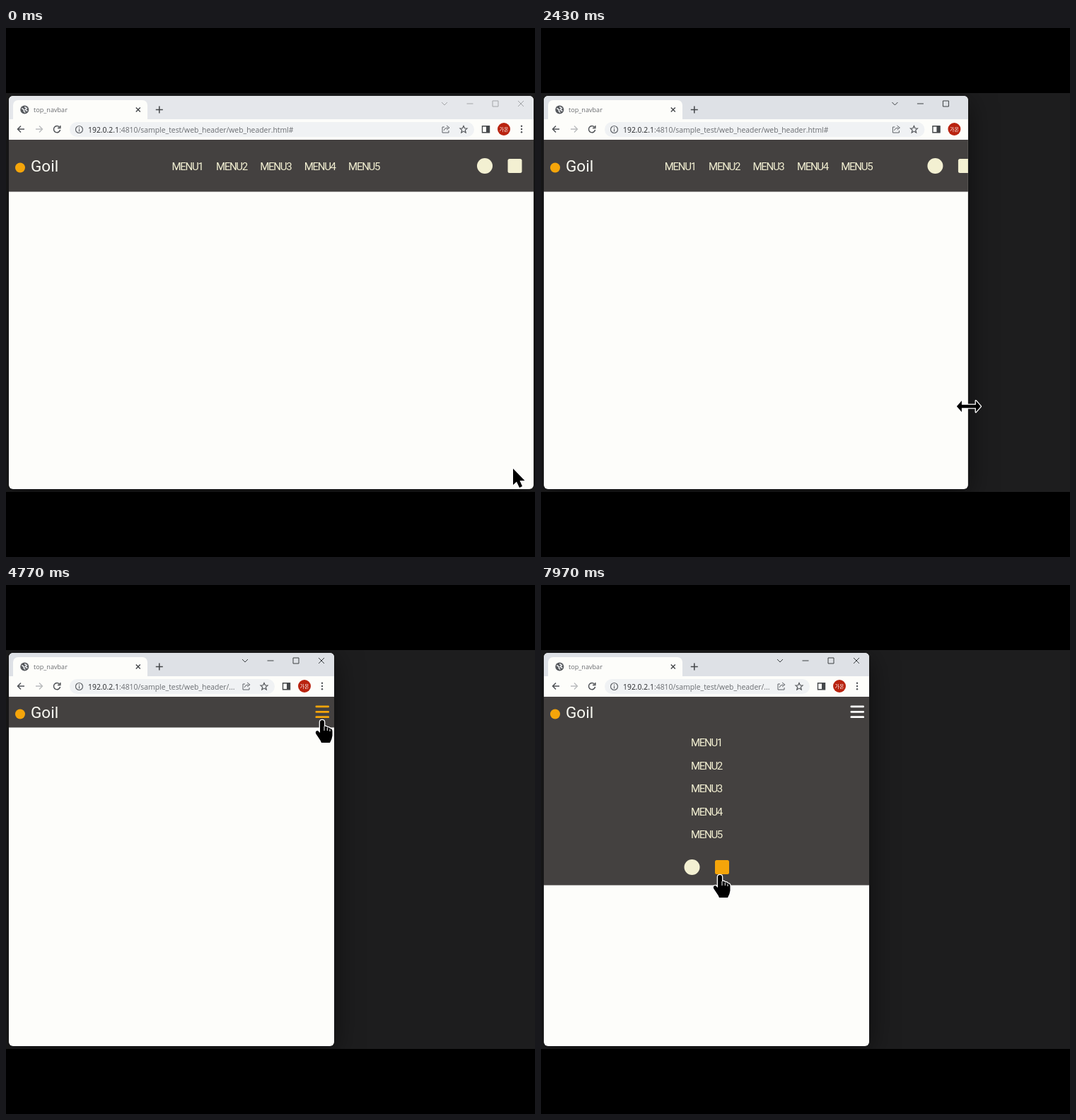
These frames come from a looping animation (748 by 748 pixels, 8 s). An HTML page with a canvas:

```html
<!DOCTYPE html>
<html lang="en">
<head>
<meta charset="utf-8">
<title>Responsive navbar</title>
<style>
  html, body { margin: 0; width: 100%; height: 100%; overflow: hidden; background: #000; }
  canvas { display: block; width: 100%; height: 100%; }
</style>
</head>
<body>
<canvas id="stage" width="748" height="748"></canvas>
<script>
const ctx = document.getElementById('stage').getContext('2d');
const LOOP = 8000, LAG = 83, BREAKPOINT = 610, OPEN_AT = 5100;
const PAGE = '#fdfdfa', NAV = '#444140', CREAM = '#f3f0d2', ORANGE = '#f5a50a', GREY = '#5f6368';
const UI = '"Open Sans", "Noto Sans", sans-serif', MENU = 'Roboto, sans-serif';
const HOST = '192.0.2.1', PATH = ':4810/sample_test/web_header/web_header.html#';

// [time, value, ...]
const edgeKeys = [[1300, 746], [1700, 716], [2130, 686], [2430, 604], [2700, 570],
  [3080, 520], [3240, 520], [3770, 492], [4200, 464]];
const pointerKeys = [[30, 717, 623], [300, 752, 585], [470, 752, 572], [600, 733, 543],
  [900, 733, 543], [1030, 754, 541], [4300, 464, 540], [4600, 447, 192], [6000, 447, 192],
  [6300, 385, 222], [6550, 320, 262], [6800, 279, 275], [7000, 281, 300], [7250, 272, 338],
  [7450, 238, 378], [7630, 213, 404], [7670, 213, 404], [7970, 253, 411]];

function at(keys, t) {
  const i = keys.findIndex(k => k[0] > t);
  if (i < 0) return keys[keys.length - 1].slice(1);
  if (i === 0) return keys[0].slice(1);
  const a = keys[i - 1], b = keys[i], p = (t - a[0]) / (b[0] - a[0]);
  return a.slice(1).map((v, n) => v + (b[n + 1] - v) * p);
}

function box(x, y, w, h, fill, r = 0) {
  ctx.fillStyle = fill;
  ctx.beginPath();
  ctx.roundRect(x, y, w, h, r);
  ctx.fill();
}

function disc(x, y, r, fill) {
  ctx.fillStyle = fill;
  ctx.beginPath();
  ctx.arc(x, y, r, 0, 7);
  ctx.fill();
}

function line(path, x, y, color = GREY, width = 1.3) {
  ctx.save();
  ctx.translate(x, y);
  ctx.strokeStyle = color;
  ctx.lineWidth = width;
  ctx.stroke(new Path2D(path));
  ctx.restore();
}

function text(s, x, y, size, color, font = UI, align = 'left', spacing = 0) {
  ctx.font = `${size}px ${font}`;
  ctx.letterSpacing = spacing + 'px';
  ctx.textAlign = align;
  ctx.fillStyle = color;
  ctx.fillText(s, x, y);
  const width = ctx.measureText(s).width;
  ctx.letterSpacing = '0px';
  return width;
}

function drawTabs(right, active) {
  const color = active ? '#3c4043' : '#a3a5a8';
  box(4, 96, 742, 33, active ? '#dee1e6' : '#e5e7eb');
  box(10, 102, 190, 28, PAGE, [7, 7, 0, 0]);
  disc(26.3, 115.5, 6, '#55585c');
  line('M-4 -2 Q0 0 -1 2 L1 4 M0 -4 L3 -2 L1 0 L4 2', 26.3, 115.5, '#e8eaed', 1.6);
  text('top_navbar', 39, 118.8, 9.1, '#6a6c70');
  line('M-3 -3 L3 3 M3 -3 L-3 3', 186.8, 115.5, '#44474a', 1.4);
  line('M-5 0 H5 M0 -5 V5', 216.8, 115.5, '#44474a', 1.5);
  line('M-4 -2 L0 2 L4 -2', right - 126, 107, color, 1);
  line('M-4.5 0 H4.5', right - 90, 107, color, 1);
  line('M-4 -4 H4 V4 H-4 Z', right - 54, 107, color, 1);
  line('M-4 -4 L4 4 M4 -4 L-4 4', right - 18, 107, color, 1);
}

function drawAddress(right) {
  box(4, 129, 742, 29, PAGE);
  line('M5 0 H-4 M0 -4.5 L-4.5 0 L0 4.5', 21, 143, '#505357', 1.5);
  line('M-5 0 H4 M0 -4.5 L4.5 0 L0 4.5', 47, 143, '#babcbe', 1.4);
  line('M3.6 -2.8 A4.6 4.6 0 1 0 4.6 1 M4.8 -5 V-1.4 H1', 72, 143, '#505357', 1.5);
  box(90, 133, right - 174, 21, '#f0f2f4', 10.5);
  line('M5 0 A5 5 0 1 1 -5 0 A5 5 0 1 1 5 0 M0 -.8 V3 M0 -3 V-1.8', 103.5, 143.5, GREY, 1.2);

  ctx.font = '10.4px ' + UI;
  let rest = PATH;
  const room = right - 139 - 116;
  if (ctx.measureText(HOST + rest).width > room) {
    while (rest && ctx.measureText(HOST + rest + '...').width > room) rest = rest.slice(0, -1);
    rest += '...';
  }
  const used = text(HOST, 116, 147.5, 10.4, '#25272a');
  text(rest, 116 + used, 147.5, 10.4, '#6a6d71');

  line('M-2 -3 H-5 V5 H4 V2 M-3 2 Q-2 -2 3 -2 M1 -5 L5 -2 L1 1', right - 124, 143, GREY, 1);
  line('M0 -5 L1.5 -1.7 L5 -1.4 L2.3 .9 L3.2 4.5 L0 2.6 L-3.2 4.5 L-2.3 .9 L-5 -1.4 L-1.5 -1.7 Z',
    right - 99, 143.5, '#505357', 1.2);
  line('M-5 -4.5 H5 V4.5 H-5 Z', right - 67.5, 143.3, '#44474a', 1.4);
  box(right - 67, 138.8, 5, 9, '#44474a');
  disc(right - 42, 143, 9, '#b9230f');
  text('가온', right - 42, 145.7, 7, '#fff', '"Noto Sans CJK KR", "Noto Sans CJK", sans-serif', 'center');
  for (let i = -1; i < 2; i++) disc(right - 17, 143 + i * 4.3, 1.2, '#505357');
}

function drawLinks(x, y, hover, stepX, stepY) {
  for (let i = 0; i < 5; i++) {
    text('MENU' + (i + 1), x + stepX * i, y + stepY * i + 5.5, 15, CREAM, MENU, 'center', -1.3);
  }
}

function drawSocial(x, y, hover) {
  disc(x, y, 11, hover === 'round' ? ORANGE : CREAM);
  box(x + 32.5, y - 10, 20, 20, hover === 'square' ? ORANGE : CREAM, 2.5);
}

function drawNav(right, mobile, open, hover) {
  const rise = mobile ? 15 : 0;
  box(4, 158, 742, open ? 266.5 : mobile ? 43.5 : 73.5, NAV);
  disc(20, 197.5 - rise, 7, ORANGE);
  text('Goil', 35, 203 - rise, 22.5, '#fafaf2', MENU);
  if (!mobile) {
    drawLinks(256.5 + (right - 746) / 2, 195, hover, 62.4, 0);
    drawSocial(right - 69, 195, hover);
    return;
  }
  for (let i = 0; i < 3; i++) {
    box(right - 26.5, 170.5 + 7.4 * i, 19.5, 2.8, hover === 'toggle' ? ORANGE : '#fff', 1.2);
  }
  if (open) {
    if (hover >= 0) box(12, 206.3 + 32.6 * hover, right - 20, 32.6, ORANGE, 7);
    drawLinks((4 + right) / 2, 222.5, hover, 0, 32.6);
    drawSocial(213.5, 399, hover);
  }
}

const pointers = {
  arrow: 'M0 0 V23 L5 18.5 L9 27 L13 25 L9.5 17 H16.5 Z',
  hand: 'M-3 2 Q-3 -1 0 -1 Q3 -1 3 2 V8 Q6 7 7.5 9.5 Q10 8.5 11 11 Q14.5 11 14.5 15 V21 ' +
    'Q14 26 11 31 H-1 Q-2 28 -5 24 L-9 18 Q-10 14 -6 14 L-3 17 Z',
  resize: 'M-17 0 L-10 -8 V-2.3 H10 V-8 L17 0 L10 8 V2.3 H-10 V8 Z'
};

function drawPointer(kind, x, y) {
  const path = new Path2D(pointers[kind]);
  ctx.save();
  ctx.translate(x, y);
  ctx.lineJoin = 'round';
  ctx.lineWidth = 2.6;
  ctx.strokeStyle = '#fff';
  ctx.stroke(path);
  ctx.fillStyle = '#000';
  ctx.fill(path);
  ctx.restore();
  if (kind === 'hand') line('M3 8 V14 M7.3 10 V14 M11 12 V15', x, y, '#fff', 1);
}

function hitTest(x, y, right, open) {
  if (Math.abs(x - right + 17) < 17 && y > 165 && y < 200) return 'toggle';
  if (!open) return null;
  const row = Math.floor((y - 206.3) / 32.6);
  if (row >= 0 && row < 5 && x > 12 && x < right - 8) return row;
  if (Math.abs(y - 399) < 15) {
    if (Math.abs(x - 213.5) < 16) return 'round';
    if (Math.abs(x - 256) < 16) return 'square';
  }
  return null;
}

function draw(t) {
  const [edge] = at(edgeKeys, t), [right] = at(edgeKeys, t - LAG);
  const dragging = t > 1310 && t < 4300, active = t > 1300;
  const mobile = right < BREAKPOINT, open = t > OPEN_AT;
  let [x, y] = at(pointerKeys, t);
  const hover = mobile && !dragging ? hitTest(x, y, right, open) : null;

  ctx.fillStyle = '#000';
  ctx.fillRect(0, 0, 748, 748);
  ctx.save();
  ctx.beginPath();
  ctx.rect(0, 92, 748, 564);
  ctx.clip();
  box(0, 92, 748, 564, '#1d1d1e');

  ctx.save();
  ctx.shadowColor = 'rgba(0,0,0,.55)';
  ctx.shadowBlur = 38;
  ctx.shadowOffsetY = 8;
  box(4, 96, edge - 4, 556, PAGE, 6);
  ctx.restore();

  ctx.save();
  ctx.beginPath();
  ctx.roundRect(4, 96, edge - 4, 556, 6);
  ctx.clip();
  drawTabs(right, active);
  drawAddress(right);
  drawNav(right, mobile, open, hover);
  ctx.restore();

  let kind = 'arrow';
  if (dragging) {
    kind = 'resize';
    x = edge + 1;
    y = t < 2430 ? 535 : Math.min(539, 535 + (t - 2430) / 180);
  } else if (typeof hover === 'string' || (hover !== null && Math.abs(x - 234) < 22)) {
    kind = 'hand';
  }
  drawPointer(kind, x, y);
  ctx.restore();
}

function tick(now) {
  draw(now % LOOP);
  requestAnimationFrame(tick);
}
requestAnimationFrame(tick);
</script>
</body>
</html>
```
